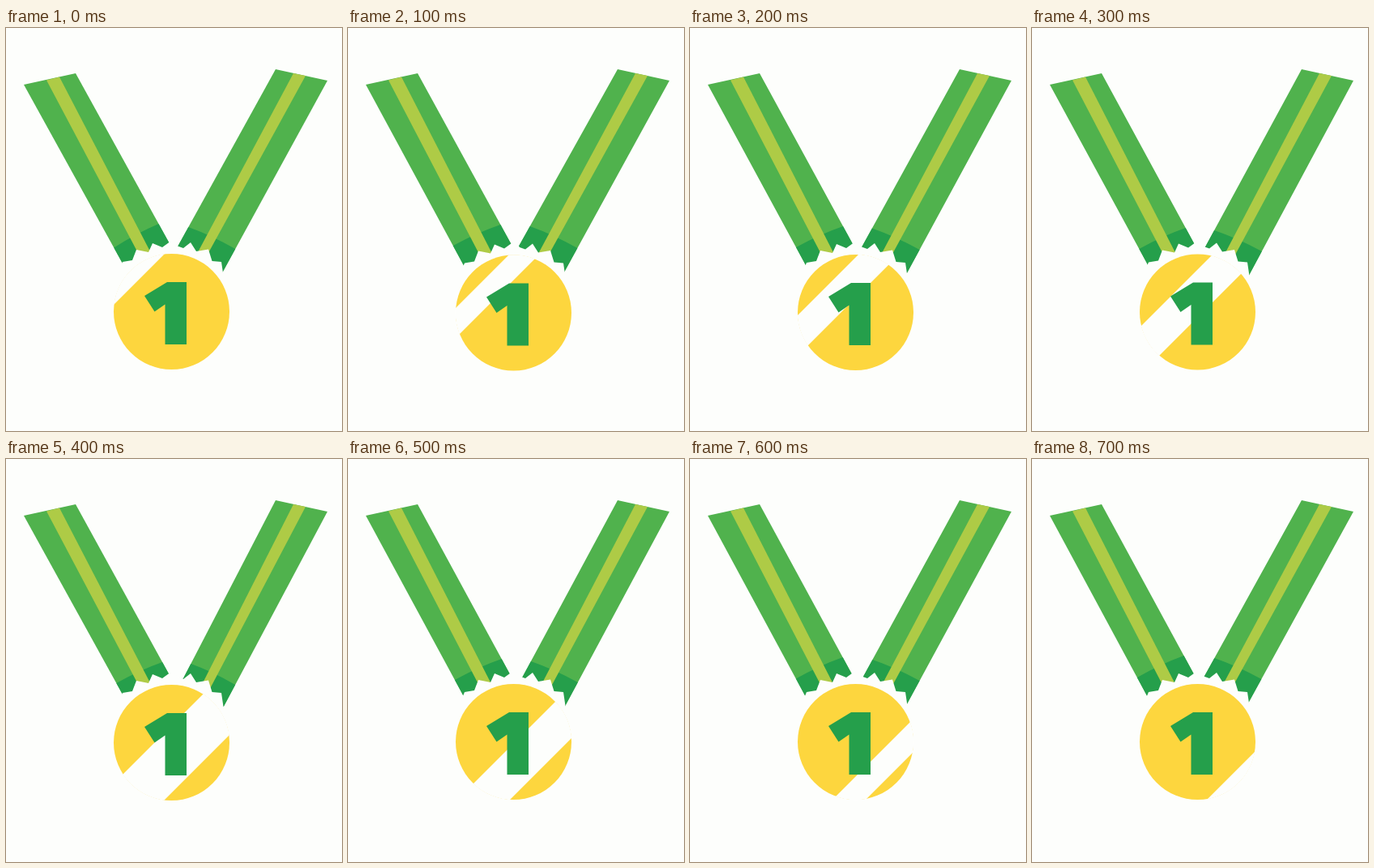
An HTML page that plays this animation: 415x498 px, repeating every 0.8 s.

```html
<!DOCTYPE html>
<html lang="en">
<head>
<meta charset="utf-8">
<title>Medal</title>
<style>
  html, body { margin: 0; width: 100%; height: 100%; overflow: hidden; background: #fdfefc; }
  svg { display: block; width: 100vw; height: 100vh; }
  .paper { fill: #fdfefc; }
  .green { fill: #50b24d; }
  .lime { fill: #aecb46; }
  .dark { fill: #259f4b; }
  .gold { fill: #fdd63e; }
</style>
</head>
<body>
<svg viewBox="0 0 415 498" role="img" aria-label="First place medal">
  <defs>
    <clipPath id="disc"><circle cx="204.5" cy="350.5" r="71.8"/></clipPath>
  </defs>
  <g id="ribbons"></g>
  <g id="medal">
    <path class="paper" d="M136 308L144 289 156 287 161 274 176 277 181 266 193 271 202 264.5
      207 262 212 269.5 219 272 228 265 235 276 250 273.5 254.5 288 266 289 268.5 306 268 325H136Z"/>
    <circle class="gold" cx="204.5" cy="350.5" r="71.5"/>
    <g clip-path="url(#disc)"><path id="shine" class="paper"/></g>
    <path class="dark" d="M171 331L199 314H223V391H196.5V341.5L183.5 350.5Z"/>
  </g>
</svg>
<script>
const STEP = 100, FOOT = 300;

// dy: medal bob; shine: band edges as x + y; left/right: ribbon foot x pair, then shade y pair
const steps = [
  { dy: 0,    shine: [430, 475], left: [149, 220.5, 271.5, 242],     right: [195.5, 268.5, 246, 273] },
  { dy: 1.5,  shine: [479, 516], left: [146.5, 219.6, 269, 243],     right: [194, 268, 245, 272] },
  { dy: 1,    shine: [488, 538], left: [146.7, 219, 271, 245],       right: [196, 269.5, 247.5, 274] },
  { dy: 0.5,  shine: [503, 562], left: [147, 218.5, 273, 247],       right: [198, 271, 250, 276] },
  { dy: 0,    shine: [534, 617], left: [149, 220, 277, 251],         right: [204, 272, 253, 279] },
  { dy: -1,   shine: [556, 621], left: [146.5, 218.5, 273, 247],     right: [199, 271, 250, 276] },
  { dy: -1,   shine: [597, 638], left: [146.2, 218.5, 271.5, 245],   right: [197, 269.5, 248, 274] },
  { dy: -1,   shine: [637, 690], left: [146, 218.5, 270, 243],       right: [195.5, 268, 246, 272] }
];

// top corners from outer left to outer right, and where the stripe meets the foot
const heads = {
  left:  { top: [[22, 70], [50, 64.5], [66, 60.5], [86, 56]], stripe: [0.36, 0.58] },
  right: { top: [[333, 51], [355, 56], [370, 59], [397, 65]], stripe: [0.40, 0.58] }
};

const NS = "http://www.w3.org/2000/svg";
const byId = id => document.getElementById(id);
const poly = pts => "M" + pts.map(p => p.join(" ")).join("L") + "Z";

function addPath(cls) {
  const path = document.createElementNS(NS, "path");
  path.setAttribute("class", cls);
  byId("ribbons").append(path);
  return path;
}

const parts = {};
for (const side in heads) parts[side] = ["green", "dark", "lime"].map(addPath);

function edgeAt([x, y], footX, atY) {
  return [x + (footX - x) * (atY - y) / (FOOT - y), atY];
}

function drawRibbon(side, [a, b, shadeA, shadeB]) {
  const { top, stripe } = heads[side];
  const [s, t] = stripe.map(k => a + (b - a) * k);
  const [body, shade, line] = parts[side];
  const footA = [a, FOOT], footB = [b, FOOT];
  const p = edgeAt(top[0], a, shadeA), q = edgeAt(top[3], b, shadeB);
  const mid = [(p[0] + q[0]) / 2, (p[1] + q[1]) / 2 - 3];
  const low = [[b, FOOT], [a, FOOT]];
  // run the cloth a little past the foot so the torn edge trims it
  const past = low.map((c, i) => edgeAt(top[i ? 0 : 3], c[0], FOOT + 6));
  body.setAttribute("d", poly([top[0], top[3], footB, ...past, footA]));
  shade.setAttribute("d", `M${p}Q${mid} ${q}L${past[0]} ${past[1]}Z`);
  line.setAttribute("d", poly([top[1], top[2], [t, FOOT], [s, FOOT]]));
}

function draw(i) {
  const { dy, shine: [from, to], left, right } = steps[i];
  drawRibbon("left", left);
  drawRibbon("right", right);
  byId("medal").setAttribute("transform", `translate(0 ${dy})`);
  const up = 250 + dy, down = 450 + dy;
  byId("shine").setAttribute("d", poly([
    [from - up, 250], [to - up, 250], [to - down, 450], [from - down, 450]
  ]));
}

const start = performance.now();
let shown = -1;
function tick(now) {
  const i = Math.floor(Math.max(0, now - start) / STEP) % steps.length;
  if (i !== shown) draw(shown = i);
  requestAnimationFrame(tick);
}
tick(start);
</script>
</body>
</html>
```
